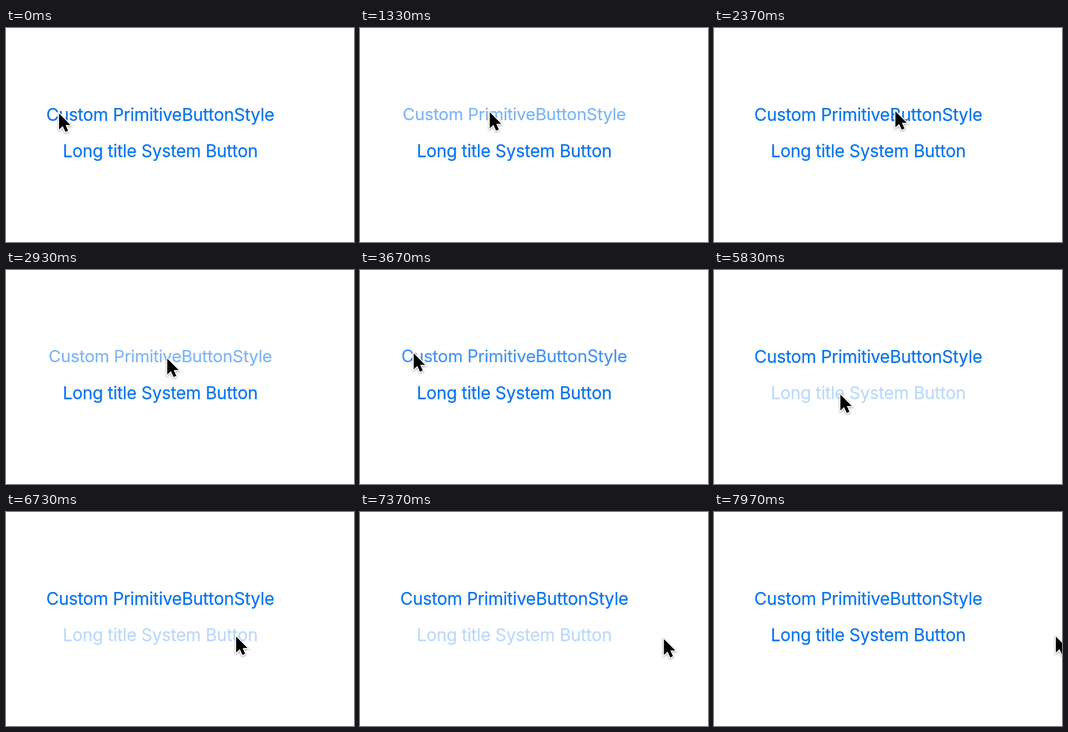
Write an HTML page that moves like this. It is 564 px wide and 348 px high and loops after 8000 ms.

```html
<!DOCTYPE html>
<html lang="en">
<head>
<meta charset="utf-8">
<style>
html, body { margin: 0; width: 100%; height: 100%; overflow: hidden; background: #fff; }
svg { display: block; }
text {
  font: 28px Inter, sans-serif; letter-spacing: -.28px; text-anchor: middle;
  fill: #0874ee; stroke: #0874ee; stroke-width: .25px;
}
#cursor { filter: drop-shadow(0 1.5px 1.5px rgba(0, 0, 0, .4)); }
</style>
</head>
<body>
<svg width="564" height="348" viewBox="0 0 564 348">
  <text id="custom" x="250" y="150.5">Custom PrimitiveButtonStyle</text>
  <text id="system" x="250" y="210">Long title System Button</text>
  <g id="cursor">
    <path d="M0 0V26L6 20.5L10.3 30L14.7 28.1L10.5 18.8H18.5Z" stroke="#fff" stroke-width="3.2" paint-order="stroke"/>
  </g>
</svg>
<script>
const LOOP = 8000;
const [custom, system, cursor] =
  ['custom', 'system', 'cursor'].map(id => document.getElementById(id));

// Progress from 0 to 1 between two times: steady, eased, and out-and-back.
const ramp = (t, start, end) => Math.min(1, Math.max(0, (t - start) / (end - start)));
const ease = (t, start, end) => {
  const p = ramp(t, start, end);
  return p * p * (3 - 2 * p);
};
const arc = (t, start, end) => Math.sin(Math.PI * ramp(t, start, end));

// How far a button is pressed, given when it goes down and up.
const press = (t, down, up, downTime, upTime) =>
  ease(t, down, down + downTime) - ease(t, up, up + upTime);

function draw(t) {
  const dragRight = ramp(t, 730, 1530) ** 1.8;
  const dragBack = ease(t, 2750, 3470);
  const moveDown = ease(t, 3830, 4530);
  const dragAway = ramp(t, 5270, 7700);
  const x = 86 + 208 * dragRight - 207 * dragBack + 13 * moveDown + 454 * dragAway;
  const y = 139 - 3.5 * dragRight + 12 * arc(t, 2750, 3470) + 67 * moveDown + 4 * arc(t, 6930, 7700);
  cursor.setAttribute('transform', `translate(${x} ${y})`);

  const held = press(t, 60, 1620, 350, 350) + press(t, 2400, 3495, 350, 350);
  custom.setAttribute('opacity', 1 - .47 * held);
  custom.setAttribute('transform', `translate(250 140) scale(${1 - .02 * held}) translate(-250 -140)`);

  system.setAttribute('opacity', 1 - .73 * press(t, 4870, 7500, 130, 470));
}

function frame() {
  draw(performance.now() % LOOP);
  requestAnimationFrame(frame);
}
frame();
</script>
</body>
</html>
```
